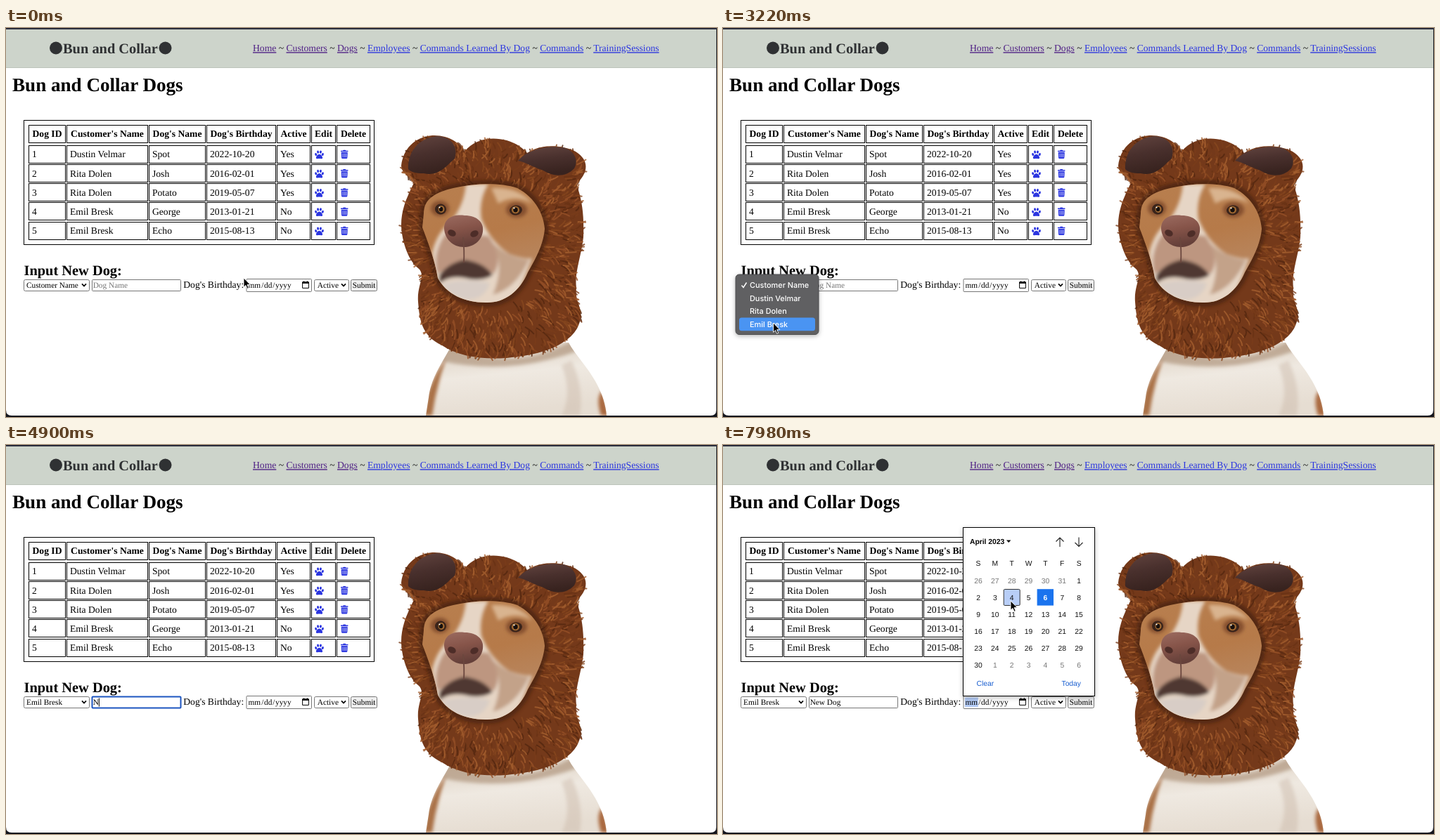
An HTML page that plays this animation: 1011x554 px, repeating every 8 s.

```html
<!DOCTYPE html>
<html lang="en">
<head>
<meta charset="utf-8">
<title>Dogs</title>
<style>
  html, body { margin: 0; width: 100%; height: 100%; overflow: hidden; background: #14151c; }
  svg { display: block; width: 1011px; height: 554px; }
  text { font: 13.6px "Liberation Serif", Times, serif; text-rendering: geometricPrecision; white-space: pre; }
  .bold { font-weight: 700; }
  .form { font-size: 11.3px; }
  .menu { font: 500 10.9px Inter, sans-serif; fill: #fff; }
  .cal { font: 10.3px "Liberation Sans", Arial, sans-serif; }
  .link { fill: #2b35e0; text-decoration: underline; }
  .seen { fill: #4f2085; }
  .line { fill: none; stroke: #000; }
  .field { fill: #fff; stroke: #767676; }
</style>
</head>
<body>
<svg id="stage" viewBox="0 0 1011 554" xmlns="http://www.w3.org/2000/svg"></svg>
<script>
const LOOP = 8000, STEP = 70;
const BRAND = "Bun and Collar";
const OWNERS = ["Dustin Velmar", "Rita Dolen", "Emil Bresk"];
const stage = document.getElementById("stage");
const $ = id => document.getElementById(id);

const text = (x, y, s, cls = "", extra = "") => `<text x="${x}" y="${y}" class="${cls}" ${extra}>${s}</text>`;
const rect = (x, y, w, h, attrs) => `<rect x="${x}" y="${y}" width="${w}" height="${h}" ${attrs}/>`;
const oval = (x, y, rx, ry, fill, turn = 0) =>
  `<ellipse cx="${x}" cy="${y}" rx="${rx}" ry="${ry}" fill="${fill}" transform="rotate(${turn} ${x} ${y})"/>`;
const shape = (d, fill, extra = "") => `<path d="${d}" fill="${fill}" ${extra}/>`;
const chevron = (x, y) => `<path d="M${x - 3} ${y - 1.6}l3 3.2 3-3.2" fill="none" stroke="#000" stroke-width="1.7"/>`;

function header() {
  const names = ["Home", "Customers", "Dogs", "Employees", "Commands Learned By Dog", "Commands", "TrainingSessions"];
  const nav = names.map((n, i) => `<tspan class="link ${i < 3 ? "seen" : ""}">${n}</tspan>`).join(" ~ ");
  return rect(0, 0, 1011, 2, 'fill="#2a2c3b"') +
    rect(0, 2, 1010, 55, 'fill="#cdd4cb"') + rect(0, 56, 1010, 1, 'fill="#bcc4ba"') +
    oval(71, 28.5, 9, 9, "#2f3133") + oval(226.5, 28.5, 9, 9, "#2f3133") +
    text(81, 36, BRAND, "bold", 'fill="#2f3133" style="font-size:20.4px"') +
    text(351, 33.3, nav, "", 'style="font-size:13.64px"') +
    text(9, 90.3, BRAND + " Dogs", "bold", 'style="font-size:27.1px"');
}

function pawIcon(x, y) {
  return [[-4.8, -.6, -18], [-1.9, -4, -8], [1.9, -4, 8], [4.8, -.6, 18]]
    .map(([dx, dy, turn]) => oval(x + dx, y + dy, 1.5, 2.1, "#2b35e0", turn)).join("") +
    shape(`M${x} ${y - .9}c2.3 0 4.6 3.2 4.6 5 0 2.3-2.6 1.3-4.6 1.3s-4.6 1-4.6-1.3c0-1.8 2.3-5 4.6-5z`, "#2b35e0");
}

function trashIcon(x, y) {
  return shape(`M${x} ${y + .7}h3l.7-1h3l.7 1h3v1.6h-10.4zM${x + .7} ${y + 3}h9l-.4 8q-.1 1-1.1 1h-6q-1 0-1.1-1z`, "#2b35e0") +
    [3, 5.2, 7.4].map(d => rect(x + d - .35, y + 4.6, .7, 5.6, 'fill="#fff"')).join("");
}

function table() {
  const edges = [[32, 84], [86, 201], [203, 283], [285, 383], [385, 432], [434, 468], [470, 517]];
  const labels = ["Dog ID", "Customer's Name", "Dog's Name", "Dog's Birthday", "Active", "Edit", "Delete"];
  const rows = [
    [1, OWNERS[0], "Spot", "2022-10-20", "Yes"],
    [2, OWNERS[1], "Josh", "2016-02-01", "Yes"],
    [3, OWNERS[1], "Potato", "2019-05-07", "Yes"],
    [4, OWNERS[2], "George", "2013-01-21", "No"],
    [5, OWNERS[2], "Echo", "2015-08-13", "No"]];
  const cells = y => edges.map(([a, b]) => rect(a + .5, y + .5, b - a, 25, 'class="line"')).join("");
  let out = rect(25.5, 131.5, 498, 177, 'class="line"') + cells(138);
  labels.forEach((s, i) => out += text((edges[i][0] + edges[i][1] + 1) / 2, 155.3, s, "bold", 'text-anchor="middle"'));
  rows.forEach((row, r) => {
    const dy = r * 27.25;
    out += cells(Math.round(166.6 + dy));
    row.forEach((s, i) => out += text(edges[i][0] + 5, 184.4 + dy, s));
    out += pawIcon(445.5, 180.6 + dy) + trashIcon(476, 174 + dy);
  });
  return out;
}

function form() {
  return text(25.5, 352, "Input New Dog:", "bold", 'style="font-size:20.4px"') +
    rect(25.5, 358.5, 93, 16, 'rx="2" class="field"') + text(29, 370, "", "form", 'id="owner"') + chevron(111, 366) +
    rect(122.5, 358.5, 126, 16, 'rx="1" class="field" id="nameBox"') +
    text(123.7, 370, "", "form", 'id="dogName"') + rect(0, 360.5, 1, 12, 'id="caret"') +
    text(252.3, 370, "Dog's Birthday:") +
    rect(342, 357.5, 92.5, 18, 'rx="1" class="field"') + rect(344, 359.5, 18.8, 13.5, 'fill="#b3cbf6" id="monthMark"') +
    [[344.5, "mm"], [363.2, "/"], [367, "dd"], [379.2, "/"], [383, "yyyy"]].map(([x, s]) => text(x, 370, s, "form")).join("") +
    shape("M421.6 362h8.8v8.4h-8.8z", "none", 'stroke="#000"') + rect(421.2, 361.5, 9.6, 2.4, "") +
    rect(423, 360.3, 1.2, 2, "") + rect(427.8, 360.3, 1.2, 2, "") +
    rect(438.5, 358.5, 49, 16, 'rx="2" class="field"') + text(442.8, 370, "Active", "form") + chevron(480, 366) +
    rect(490.5, 358.5, 37, 16, 'rx="2" fill="#efefef" stroke="#767676"') + text(492.8, 370, "Submit", "form");
}

const BODY = "M632 455C618 480 604 500 601 526L597 552H854C852 528 842 506 824 482C812 466 804 456 800 448Z";
const FACE = "M594 264C594 244 610 234 636 228C668 221 702 220 727 228C750 240 764 262 766 286C764 310 752 330 742 348C730 376 708 392 682 391C652 391 626 379 614 356C610 330 598 300 592 284Z";
const HOOD = "M562 196C565 172 580 156 606 153C630 152 646 164 652 176C666 158 690 154 712 160C726 164 736 172 741 178C758 166 788 165 810 176C832 190 826 208 811 222C820 246 822 270 821 298C818 326 808 348 811 370C808 396 826 400 812 428C798 452 762 464 728 468C690 474 646 470 620 452C590 438 588 414 586 390C584 366 598 352 586 342C570 330 562 298 562 280C562 254 574 234 582 216C572 210 562 206 562 196Z";

function dog() {
  return shape(BODY, "url(#coat)") +
    `<g clip-path="url(#bodyClip)" filter="url(#soft)">` +
    shape("M628 452Q720 492 806 445L812 460Q715 496 618 474Z", "#a78a70", 'opacity=".6"') +
    shape("M594 552L600 520Q610 490 626 470Q612 510 606 552Z", "#a96f45") +
    shape("M858 552L848 516Q838 526 846 552Z", "#a9683c") +
    shape("M790 480Q806 520 790 552H816Q822 510 804 474Z", "#c9b9a8", 'opacity=".45"') + `</g>` +
    shape(HOOD, "#74391a", 'id="hood"') +
    `<g id="fur" fill="none" stroke-linecap="round"></g>` +
    shape(FACE, "none", 'stroke="#3c1b0d" stroke-width="12" opacity=".6" filter="url(#soft)"') +
    shape("M572 201C571 177 586 157 612 154C632 154 644 168 638 186C626 196 616 212 594 207C582 207 576 205 572 201Z", "url(#ear)") +
    shape("M728 189C742 174 764 167 792 170C808 174 815 188 808 200C796 213 778 212 764 203C750 198 738 191 728 189Z", "url(#ear)") +
    shape(FACE, "url(#tan)") +
    `<g clip-path="url(#faceClip)" filter="url(#soft)">` +
    shape("M690 228Q730 226 748 250Q724 236 700 250Z", "#d9b48f") +
    shape("M654 222H686Q672 244 676 272Q690 306 716 322Q736 330 748 328L720 400H610L606 320Q612 292 634 274Q652 250 654 222Z", "#e6d5c5") +
    shape("M626 292Q606 318 613 350Q650 328 694 350Q708 326 686 296Z", "#bd9680") +
    shape("M692 306Q710 340 692 380Q724 372 744 330Q716 328 692 306Z", "#c3a289") +
    shape("M616 352Q630 334 652 330Q680 334 692 352Q676 362 652 356Q630 352 616 364Z", "#4f3831") +
    shape("M620 364Q650 356 688 363Q680 390 650 386Q630 380 620 364Z", "#d8cdc6") +
    oval(617, 257, 13, 11, "#85502d") + oval(726, 259, 15, 11, "#85502d") + `</g>` +
    oval(618, 258, 8, 7.5, "#3a241b", 15) + oval(619, 258, 4.5, 5, "#a36b32") + oval(618.5, 258, 2.8, 3.2, "#160f0d") +
    oval(725, 259.5, 9, 7, "#3a241b", -8) + oval(724.5, 259, 5.5, 5.2, "#a36b32") + oval(724.5, 259, 3.2, 3.4, "#160f0d") +
    oval(616.5, 255.5, 1.1, 1.1, "#fff") + oval(722.5, 256.5, 1.1, 1.1, "#fff") +
    shape("M623 286C623 270 637 265 652 267C670 267 680 277 678 290C676 304 664 312 651 312C635 312 624 300 623 286Z", "url(#nose)") +
    oval(634, 292, 6, 4.5, "#4d2d28", 25) + oval(666, 293, 6, 4.5, "#4d2d28", -25) +
    shape("M650 298Q652 318 651 334", "none", 'stroke="#6b473e" stroke-width="1.8"');
}

function furStrokes() {
  let seed = 41;
  const rand = () => (seed = (seed * 16807) % 2147483647) / 2147483647;
  const hood = $("hood"), len = hood.getTotalLength(), cx = 680, cy = 312;
  const tones = ["#54270f", "#6a3315", "#87481f", "#965127", "#a5602f", "#7a3d1b"];
  const paths = tones.map(() => "");
  for (let i = 0; i < 1300; i++) {
    const p = hood.getPointAtLength(rand() * len), k = 1 - .42 * rand() ** 1.2;
    const x = cx + (p.x - cx) * k, y = cy + (p.y - cy) * k;
    const angle = Math.atan2(y - cy, x - cx) + (rand() - .5) * 1.4, size = 6 + rand() * 9;
    const dx = Math.cos(angle) * size, dy = Math.sin(angle) * size + 1;
    paths[i % tones.length] += `M${(x - dx * .7).toFixed(1)} ${(y - dy * .7).toFixed(1)}q${(dx * .5 + 2).toFixed(1)} ${(dy * .5).toFixed(1)} ${dx.toFixed(1)} ${dy.toFixed(1)}`;
  }
  $("fur").innerHTML = paths.map((d, i) => `<path d="${d}" stroke="${tones[i]}" stroke-width="2" opacity=".8"/>`).join("");
}

function menu() {
  return `<g id="menu">` + rect(18, 351, 118, 85.5, 'rx="5" fill="#606162" stroke="#4d4d4e" filter="url(#shadow)"') +
    rect(23, 0, 108, 18.7, 'rx="3.5" fill="#4a94f2" id="pick"') +
    shape("M26.5 366.5l2.5 3 4.5-7", "none", 'stroke="#fff" stroke-width="1.4"') +
    ["Customer Name", ...OWNERS].map((s, i) => text(38, 370 + i * 18.7, s, "menu")).join("") + `</g>`;
}

const dayX = c => 363 + c * 23.85, dayY = r => 193 + r * 24;

function calendar() {
  const label = (x, y, s, color, extra = "") => text(x, y, s, "cal", `text-anchor="middle" fill="${color}" ${extra}`);
  let out = `<g id="calendar">` + rect(341.5, 117.5, 187, 240, 'fill="#fff" stroke="#000" filter="url(#shadow)"') +
    text(351, 140.8, "April 2023", "cal", 'style="font-weight:700"') + shape("M403 135.5h6.4l-3.2 3.6z", "#000") +
    shape("M479 145v-13M473.5 137.5l5.5-5.5 5.5 5.5M506 131.5v13M500.5 139l5.5 5.5 5.5-5.5", "none", 'stroke="#222" stroke-width="1.1"') +
    rect(0, 0, 23, 23, 'rx="1.5" fill="#b8cef7" stroke="#333" id="hover"') +
    rect(dayX(4) - 11.8, dayY(1) - 11.8, 23.4, 23.4, 'fill="#1a73ee"');
  [..."SMTWTFS"].forEach((s, c) => out += label(dayX(c), 172, s, "#111"));
  for (let i = 0; i < 42; i++) {
    const n = i - 5, inside = n > 0 && n < 31, day = n < 1 ? n + 31 : n > 30 ? n - 30 : n;
    const color = n === 6 ? "#fff" : inside ? "#111" : "#757575";
    out += label(dayX(i % 7), dayY(Math.floor(i / 7)) + 3.8, day, color, n === 6 ? 'style="font-weight:700"' : "");
  }
  return out + text(360.5, 342.6, "Clear", "cal", 'fill="#1a5fd0"') + text(481.5, 342.6, "Today", "cal", 'fill="#1a5fd0"') + `</g>`;
}

const cursors = `<g id="pointer">
  <path id="arrow" d="M0 0v13.2l3-2.8 2.1 4.9 2.1-.9-2.1-4.8h4.2z" fill="#000" stroke="#fff" stroke-width=".9"/>
  <path id="beam" d="M-2.8-6q2.8 0 2.8 2v8q0 2 2.8 2M2.8-6q-2.8 0-2.8 2v8q0 2-2.8 2M-1.6 2.5h3.2" fill="none" stroke="#000" stroke-width="1.1"/></g>`;

const gradient = (id, a, b, c) => `<linearGradient id="${id}" x2=".25" y2="1"><stop stop-color="${a}"/>
  <stop offset=".5" stop-color="${b}"/><stop offset="1" stop-color="${c}"/></linearGradient>`;

stage.innerHTML = `<defs>
  ${gradient("coat", "#d9cbbb", "#efe9e1", "#e6ddd2")}${gradient("tan", "#b87f4f", "#b67a49", "#b98c69")}
  ${gradient("ear", "#62443f", "#49302d", "#38231f")}${gradient("nose", "#9b6b60", "#865449", "#65403a")}
  <filter id="soft"><feGaussianBlur stdDeviation="2.5"/></filter>
  <filter id="shadow" x="-20%" y="-20%" width="140%" height="140%"><feDropShadow dx="0" dy="2" stdDeviation="3" flood-opacity=".28"/></filter>
  <clipPath id="bodyClip"><path d="${BODY}"/></clipPath>
  <clipPath id="faceClip"><path d="${FACE}"/></clipPath></defs>` +
  rect(0, 0, 1011, 554, 'fill="#14151c"') +
  shape("M0 2H1010V544Q1010 552 1002 552H8Q0 552 0 544Z", "#fff") +
  header() + table() + form() + dog() + menu() + calendar() + cursors;
furStrokes();

// Pointer stops: time, x, y
const stops = [[0, 338, 356], [210, 338, 356], [1190, 50, 352], [1470, 46, 357], [1820, 44, 366], [2030, 44, 366],
  [2380, 54, 395], [2730, 62, 421], [3290, 72, 420], [3570, 91, 405], [4060, 165, 367], [6300, 165, 367],
  [7070, 427, 365], [7420, 427, 365], [7840, 409, 222], [8000, 409, 222]];
const MENU_OPEN = 1960, MENU_PICK = 3430, FOCUS = 4270, TYPE = 4830, KEY = 220, DATE_OPEN = 7420;
const NAME = "New Dog";

function pointerAt(t) {
  const i = Math.max(1, stops.findIndex(s => s[0] >= t));
  const [t0, x0, y0] = stops[i - 1], [t1, x1, y1] = stops[i];
  const u = (t - t0) / (t1 - t0), e = u * u * (3 - 2 * u);
  return [x0 + (x1 - x0) * e, y0 + (y1 - y0) * e];
}

const show = (id, on) => $(id).setAttribute("visibility", on ? "visible" : "hidden");
const set = (id, attrs) => Object.entries(attrs).forEach(([k, v]) => $(id).setAttribute(k, v));

function update(t) {
  const [x, y] = pointerAt(t);
  const fade = Math.max(0, Math.min(1, 1 - (t - 3500) / 120));
  const menuOn = t >= MENU_OPEN && fade > 0, dateOn = t >= DATE_OPEN;

  const overText = (y > 335 && y < 358 && x > 25 && x < 165) || (y >= 358 && y < 375 && x > 122 && x < 339);
  const pointerOn = t < TYPE || t >= 6300, beam = overText && !menuOn;
  set("pointer", { transform: `translate(${x} ${y})` });
  show("arrow", pointerOn && !beam);
  show("beam", pointerOn && beam);

  // The highlight trails the pointer a little and stays on the chosen row.
  const trail = Math.max(0, Math.min(t, MENU_PICK) - 140);
  const row = Math.max(0, Math.min(3, Math.floor((pointerAt(trail)[1] - 356) / 18.7)));
  set("menu", { opacity: menuOn ? fade : 0 });
  set("pick", { y: 356.5 + row * 18.7 });
  $("owner").textContent = t < 3640 ? "Customer Name" : OWNERS[2];

  const typed = NAME.slice(0, t < TYPE ? 0 : Math.floor((t - TYPE) / KEY) + 1);
  const focused = t >= FOCUS && !dateOn;
  $("dogName").textContent = typed || "Dog Name";
  set("dogName", { fill: typed ? "#000" : "#757575" });
  set("nameBox", { style: focused ? "stroke:#1c55c0;stroke-width:2" : "" });
  const lastKey = t < TYPE ? FOCUS : Math.min(TYPE + (NAME.length - 1) * KEY, t - (t - TYPE) % KEY);
  set("caret", { x: 123.7 + (typed ? $("dogName").getComputedTextLength() : 0) });
  show("caret", focused && (t - lastKey) % 1000 < 500);

  const col = Math.round((x - 363) / 23.85), week = Math.round((y - 193) / 24);
  show("calendar", dateOn);
  show("monthMark", dateOn);
  show("hover", dateOn && week >= 0 && week < 6);
  set("hover", { x: dayX(col) - 11.5, y: dayY(week) - 11.5 });
}

const start = performance.now();
function tick() {
  const t = (performance.now() - start) % LOOP;
  update(Math.floor(t / STEP) * STEP);
  requestAnimationFrame(tick);
}
tick();
</script>
</body>
</html>
```
